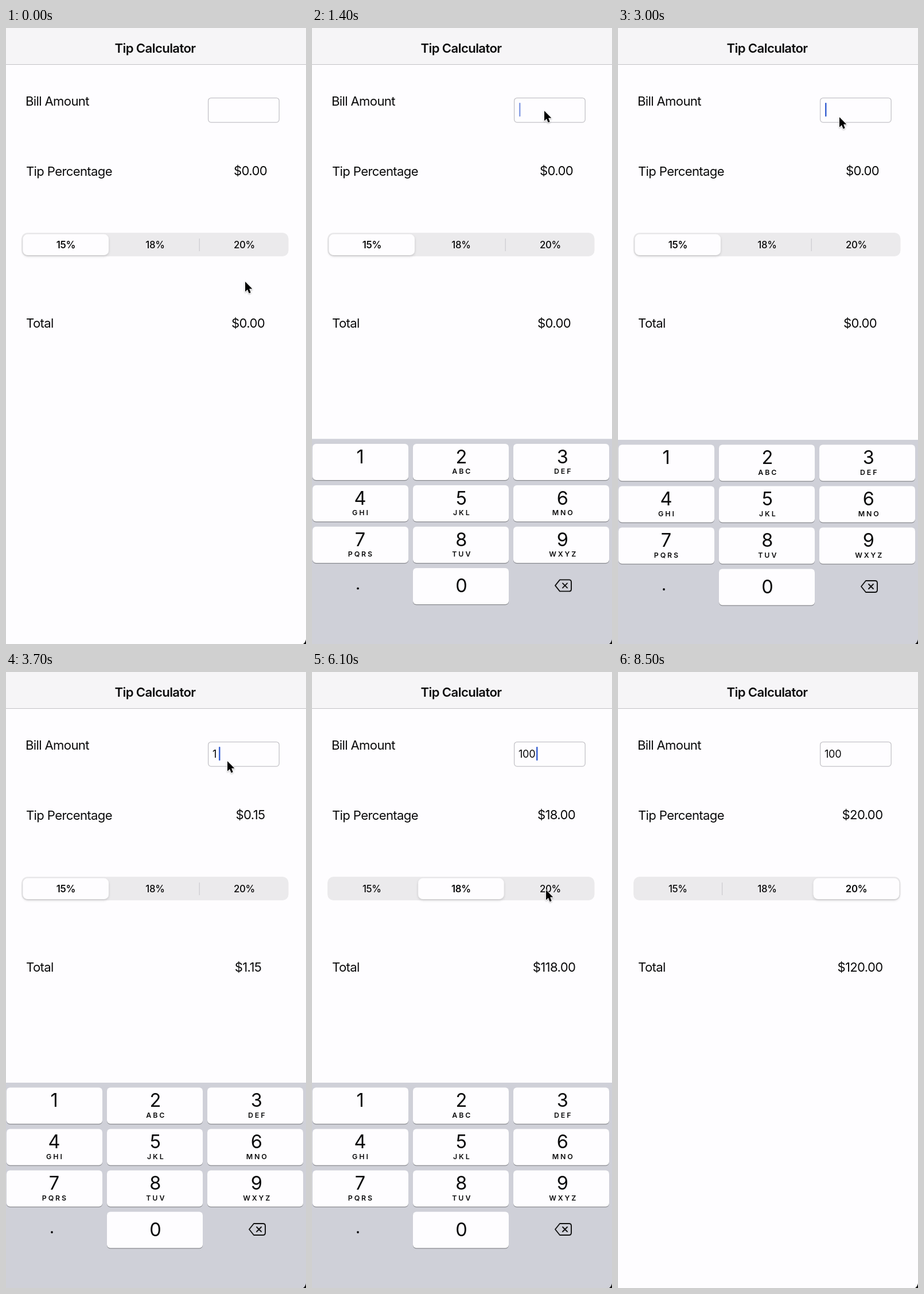
Recreate the animation shown at these times as an HTML page. Size 523 by 1071 pixels, loop 9100 ms.

```html
<!DOCTYPE html>
<html lang="en">
<head>
<meta charset="utf-8">
<title>Tip Calculator</title>
<style>
  html, body { margin: 0; width: 100%; height: 100%; overflow: hidden; background: #fefdff; }
  svg { display: block; width: 100%; height: 100%; }
  text { font: 400 22.1px Inter, Roboto, sans-serif; letter-spacing: -.029em; fill: #0a0a0b; }
  .mid { text-anchor: middle; }
  .title { font-weight: 600; letter-spacing: -.026em; }
  .seg { font-size: 16.8px; font-weight: 500; letter-spacing: -.02em; }
  .seg.on { font-weight: 600; }
  .sep { fill: #cbcacf; }
  .field { font-size: 18.2px; letter-spacing: -.015em; }
  .digit { font-size: 32.5px; letter-spacing: 0; }
  .letters { font-size: 12.4px; font-weight: 600; letter-spacing: 2.9px; }
</style>
</head>
<body>
<svg viewBox="0 0 523 1071" preserveAspectRatio="none">
  <defs>
    <filter id="soft" x="-10%" y="-20%" width="120%" height="150%">
      <feDropShadow dx="0" dy="2" stdDeviation="2" flood-opacity=".16"/>
    </filter>
    <filter id="lift" x="-40%" y="-30%" width="200%" height="180%">
      <feDropShadow dx="0" dy="1.2" stdDeviation="1" flood-opacity=".3"/>
    </filter>
  </defs>

  <rect width="523" height="1071" fill="#fefdff"/>
  <rect width="523" height="63" fill="#f6f5f7"/>
  <rect y="63" width="523" height="1" fill="#c3c2c5"/>
  <text class="mid title" x="260" y="43">Tip Calculator</text>

  <text x="34" y="135">Bill Amount</text>
  <text x="35" y="257">Tip Percentage</text>
  <text x="35" y="520.5">Total</text>
  <text class="mid" id="tip" x="426" y="255.5"></text>
  <text class="mid" id="total" x="422" y="520.5"></text>

  <rect x="352.6" y="121.6" width="123.6" height="42.5" rx="5" fill="#fefdff" stroke="#c4c3c8" stroke-width="1.3"/>
  <text class="field" id="bill" x="360" y="149"></text>
  <rect id="caret" y="130" width="2.5" height="24" rx="1" fill="#3a62d2"/>

  <rect x="27" y="356" width="465.5" height="41" rx="10.5" fill="#ebeaec"/>
  <rect class="sep" x="181" y="366" width="1.2" height="22"/>
  <rect class="sep" x="336.6" y="366" width="1.2" height="22"/>
  <rect id="thumb" x="29.5" y="358.5" width="149.5" height="36.5" rx="8.5" fill="#fefdff" filter="url(#soft)"/>
  <g id="segments"></g>

  <g id="pad">
    <rect y="714" width="523" height="360" fill="#cfd0d8"/>
    <g id="keys"></g>
    <circle cx="80" cy="974" r="1.9" fill="#0a0a0b"/>
    <path d="M424 969 L432 959 H448 Q452 959 452 963 V975 Q452 979 448 979 H432 Z m13 -4 l8 8 m0 -8 l-8 8"
      fill="none" stroke="#111" stroke-width="1.9" stroke-linejoin="round" stroke-linecap="round"/>
  </g>

  <path d="M523 1063 V1071 H518 Q522 1068 523 1063 Z" fill="#111"/>
  <path id="cursor" d="M0 0 V17.5 L4 13.8 L6.6 20.2 L9.7 18.9 L7.1 12.6 H12.4 Z"
    stroke="#fff" stroke-width="1.7" paint-order="stroke" stroke-linejoin="round" filter="url(#lift)"/>
</svg>

<script>
const LOOP = 9100, STEP = 100, PAD_HEIGHT = 357, SEG_WIDTH = 155.6;
const RATES = [15, 18, 20];
const FOCUS = [[900, 1850], [2600, 6990]]; // field gains and loses focus
const TYPING = 3700;                       // first key press, then one per step
const TAPS = [5050, 6250];                 // segment changes

const home = { x: 417, y: 441 };
const moves = [
  { at: 0, ms: 600, x: 405, y: 144, bow: 50 },
  { at: 1400, ms: 300, x: 336, y: 229 },
  { at: 1900, ms: 400, x: 386, y: 155 },
  { at: 4200, ms: 400, x: 268, y: 427 },
  { at: 4700, ms: 100, x: 255, y: 402 },
  { at: 4800, ms: 200, x: 257, y: 380 },
  { at: 5700, ms: 400, x: 408, y: 379 },
  { at: 6500, ms: 300, x: 361, y: 417 },
  { at: 7100, ms: 600, x: 112, y: 715 },
  { at: 7950, ms: 250, x: 505, y: 104 },
  { at: 8300, ms: 100, x: 499, y: 102 }
];

const $ = id => document.getElementById(id);
const set = (id, name, value) => $(id).setAttribute(name, value);
const clamp = v => Math.max(0, Math.min(1, v));
const smooth = k => k * k * (3 - 2 * k);

// Critically damped spring from 0 to 1
function spring(ms) {
  const x = 18.26 * Math.max(0, ms) / 1000;
  return 1 - (1 + x) * Math.exp(-x);
}

function pointer(t) {
  let { x, y } = home;
  for (const m of moves) {
    const raw = clamp((t - m.at) / m.ms), k = smooth(raw);
    x += (m.x - x) * k + (m.bow || 0) * Math.sin(Math.PI * raw);
    y += (m.y - y) * k;
  }
  return { x, y, shown: t < 7800 || (t >= 8000 && t < 8500) };
}

const padShown = t =>
  FOCUS.reduce((sum, [on, off]) => sum + spring(t - on) - spring(t - off), 0);

function caretAlpha(t, typed) {
  const session = FOCUS.find(([on, off]) => t >= on && t < off);
  if (!session) return 0;
  const since = typed ? TYPING + (typed - 1) * STEP : session[0];
  const phase = (t - since) / 1000 % 1;
  return clamp((.62 - phase) / .2) + clamp((phase - .88) / .12);
}

function keyCap(x, y, digit, word = '') {
  const cx = 84 + (x - 1) * 1.008;
  const cap = (dy, fill) =>
    `<rect x="${x}" y="${y + dy}" width="167" height="63" rx="6" fill="${fill}"/>`;
  return cap(1.3, '#898a8f') + cap(0, '#fefdff') +
    `<text class="mid digit" x="${cx}" y="${y + (word || digit ? 33.8 : 42.3)}">${digit}</text>` +
    `<text class="mid letters" x="${cx + 1.4}" y="${y + 52.3}">${word}</text>`;
}

function build() {
  const words = ['', 'ABC', 'DEF', 'GHI', 'JKL', 'MNO', 'PQRS', 'TUV', 'WXYZ', '', ''];
  $('keys').innerHTML = words.map((word, i) => i === 9 ? '' :
    keyCap(1 + 175 * (i % 3), 722.5 + 72 * Math.floor(i / 3), (i + 1) % 11, word)).join('');
  $('segments').innerHTML = RATES.map((rate, i) =>
    `<text class="mid seg" x="${104.3 + SEG_WIDTH * i}" y="383">${rate}%</text>`).join('');
}

function draw(t) {
  const typed = Math.max(0, Math.min(3, Math.floor((t - TYPING) / STEP) + 1));
  const bill = '100'.slice(0, typed);
  const choice = TAPS.filter(tap => t > tap).length;
  const tip = bill * RATES[choice] / 100;
  $('bill').textContent = bill;
  $('tip').textContent = '$' + tip.toFixed(2);
  $('total').textContent = '$' + (+bill + tip).toFixed(2);

  set('caret', 'x', 361 + 10 * typed);
  set('caret', 'opacity', caretAlpha(t, typed));

  const slide = TAPS.reduce((sum, tap) => sum + spring(t - tap), 0);
  set('thumb', 'transform', `translate(${SEG_WIDTH * slide})`);
  document.querySelectorAll('.sep').forEach((el, i) =>
    el.setAttribute('opacity', clamp(i ? 1 - slide : slide - 1)));
  document.querySelectorAll('.seg').forEach((el, i) =>
    el.classList.toggle('on', i === choice));

  set('pad', 'transform', `translate(0 ${PAD_HEIGHT * (1 - padShown(t))})`);

  const { x, y, shown } = pointer(t);
  set('cursor', 'transform', `translate(${x} ${y})`);
  set('cursor', 'visibility', shown ? 'visible' : 'hidden');
}

build();
const start = performance.now();
function tick() {
  const t = (performance.now() - start) % LOOP;
  draw(Math.floor(t / STEP) * STEP);
  requestAnimationFrame(tick);
}
tick();
</script>
</body>
</html>
```
